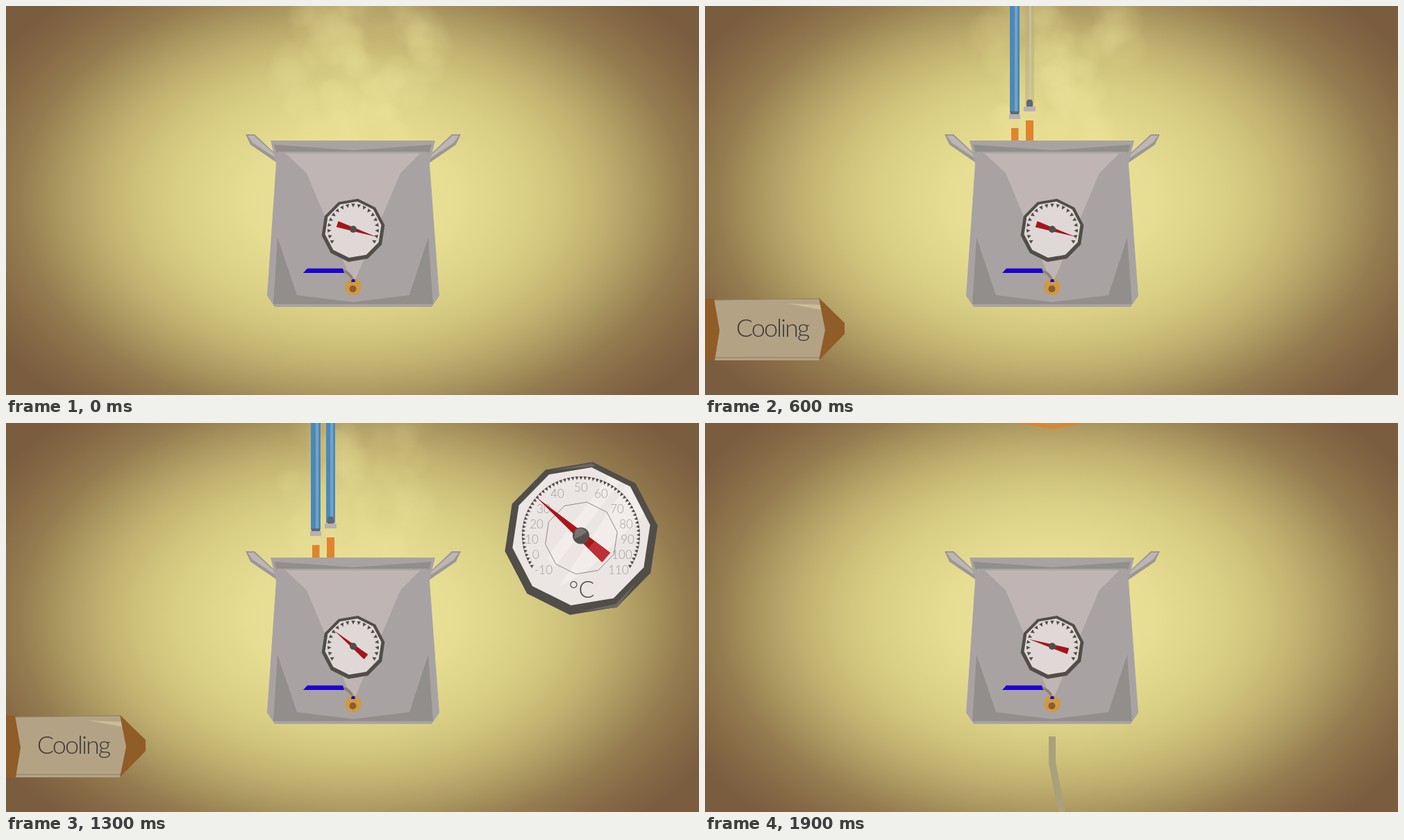
Write an HTML page that moves like this. It is 998 px wide and 561 px high and loops after 2 s.

```html
<!DOCTYPE html>
<html lang="en">
<head>
<meta charset="utf-8">
<title>Cooling the wort</title>
<style>
  html, body { margin: 0; width: 100%; height: 100%; overflow: hidden; background: #7a5c3f; }
  svg { display: block; width: 100vw; height: 100vh; }
  text { font-family: Lato, "Open Sans", sans-serif; font-weight: 300; text-anchor: middle; }
  .metal { fill: #a8a3a2; }
  .shade { fill: #928e8b; }
  .light { fill: #beb5b4; }
  .frame { fill: #514d48; }
  .brown { fill: #905c28; }
  .copper { fill: #e0842f; }
  .joint { fill: #e6db92; }
  .water { fill: #4c89b8; }
  .coil { fill: none; stroke: #e0842f; stroke-width: 5; }
</style>
</head>
<body>
<svg viewBox="0 0 998 561" preserveAspectRatio="none">
  <defs>
    <radialGradient id="backdrop" gradientUnits="userSpaceOnUse" r="600"
      gradientTransform="translate(499 280) scale(1 .667)" cx="0" cy="0">
      <stop offset="0" stop-color="#ebe4a0"/>
      <stop offset=".25" stop-color="#e6dd92"/>
      <stop offset=".4" stop-color="#dbd186"/>
      <stop offset=".5" stop-color="#d0c47c"/>
      <stop offset=".6" stop-color="#c1b170"/>
      <stop offset=".7" stop-color="#ab9860"/>
      <stop offset=".8" stop-color="#957c50"/>
      <stop offset=".9" stop-color="#866a46"/>
      <stop offset="1" stop-color="#7a5c3f"/>
    </radialGradient>
    <radialGradient id="puff">
      <stop offset="0" stop-color="#ece39b"/>
      <stop offset=".65" stop-color="#ece39b" stop-opacity=".8"/>
      <stop offset="1" stop-color="#ece39b" stop-opacity="0"/>
    </radialGradient>
    <clipPath id="bigFace"><path id="faceClip"/></clipPath>
    <g id="handle">
      <path fill="#9b9795" d="M345 185H358L390 215V226L352 200Z"/>
      <path class="light" d="M348 187H357L388 215V219L355 197Z"/>
    </g>
  </defs>

  <rect width="998" height="561" fill="url(#backdrop)"/>
  <g id="smoke"></g>

  <g id="chiller">
    <g id="turns"></g>
    <path class="coil" d="M467 220L421 234"/>
    <path class="copper" d="M441 176h10.500v125h-10.500ZM462 165h11v58h-11Z"/>
    <path class="joint" d="M440 163h12v13h-12ZM461 152h13v13h-13Z"/>
    <g fill="#b9ae85" fill-opacity=".5">
      <path d="M439-600h14V156h-14ZM461-600h13V144h-13Z"/>
      <path fill="#d6ceb0" d="M447-600h2V156h-2ZM467-600h3V144h-3Z"/>
    </g>
    <g id="leftWater"><rect class="water" x="439" width="14" height="754"/><rect x="446" width="4" height="754" fill="#70a3c8"/></g>
    <g id="rightWater"><rect class="water" x="461" width="13" height="744"/><rect x="467" width="4" height="744" fill="#70a3c8"/></g>
    <path fill="#5e6870" d="M440 152h12v4h-12ZM463 138l2-3h5l2 3v7h-9Z"/>
    <path fill="#b9b1b0" d="M438 156h16v7h-16ZM459 145h17v7h-17Z"/>
  </g>

  <g id="kettle">
    <use href="#handle"/>
    <use href="#handle" transform="translate(1000) scale(-1 1)"/>
    <path class="metal" d="M381 194H618L610 227L624 418L613 434H387L376 418L389 227Z"/>
    <path class="light" d="M402 212H597L568 241L503 395H497L433 241Z"/>
    <path class="shade" d="M386 200L500 208L613 200L609 212H390Z"/>
    <path class="metal" d="M391 210H608V212.500H391Z"/>
    <path class="shade" d="M391 334L419 417L500 427L581 417L608 334L615 430H385Z"/>
    <path fill="none" stroke="#8c8377" stroke-width="4" d="M485 382Q495 384 500 396"/>
    <path fill="#1c00d0" d="M434 378.500H485L487 385H428Z"/>
    <circle cx="500" cy="405" r="12" fill="#cf9a45"/>
    <circle cx="499.500" cy="408" r="5" fill="#8d5d2d"/>
    <path fill="#1c00d0" d="M498 394h4l1 4h-6Z"/>
    <path class="frame" id="smallRim"/>
    <path fill="#dfd8d7" id="smallFace"/>
    <path class="frame" id="smallTicks"/>
    <path id="smallNeedle" fill="#a31519" d="M-24-4.500L35 0L-24 4.500Z"/>
    <circle cx="500" cy="322" r="5" class="frame"/>
  </g>

  <g id="dial">
    <path class="frame" id="bigRim"/>
    <path fill="#6b6763" d="M826 272L878 261L908 230L880 266Z"/>
    <path fill="#6b6763" d="M786 68L844 58L849 62L842 63Z"/>
    <path fill="#ebe5e3" id="bigFace2"/>
    <g clip-path="url(#bigFace)" fill="#f4f0ec" fill-opacity=".75">
      <path d="M796 237L896 85L925 125L838 212Z"/>
      <path d="M779 194L873 70L888 80L790 208Z"/>
    </g>
    <path class="frame" id="bigTicks"/>
    <path id="innerRing" fill="none" stroke="#8f8a87"/>
    <g id="numbers" font-size="17" fill="#a39d9b"></g>
    <text x="829" y="252" font-size="34" fill="#4c4744">°C</text>
    <g id="bigNeedle">
      <path fill="#a9151b" d="M-48-9L85 0L-48 9Z"/>
      <path fill="#bd3036" d="M-48-9L-20-7V7L-48 9Z"/>
    </g>
    <circle cx="828" cy="162.500" r="12" fill="#55514d"/>
    <path fill="#77736f" d="M820 154L829 151L837 157L828 163L818 167Z"/>
  </g>

  <g id="label">
    <path fill="#b3a384" d="M8 424L165 422L174 467L165 511H8Z"/>
    <path fill="#c9bd95" d="M118 429L166 431L167 438Z"/>
    <path fill="none" stroke="#8d7d60" d="M14 507H166M14 424L165 422"/>
    <path class="brown" d="M0 422H13L21 468L14 511H0ZM164 421L201 457V473L164 511L173 467Z"/>
    <text x="97" y="477" font-size="36" letter-spacing="-2" fill="#3e3a38">Cooling</text>
  </g>

  <path id="hose" fill="none" stroke="#aaa07b" stroke-width="10" stroke-linejoin="round" d="M500 452V490L510 542L514 561"/>
</svg>
<script>
const LOOP = 2000, STEP = 100;
const byId = id => document.getElementById(id);
const rad = deg => deg * Math.PI / 180;
const polar = (cx, cy, r, deg) =>
  `${(cx + r * Math.cos(rad(deg))).toFixed(2)} ${(cy + r * Math.sin(rad(deg))).toFixed(2)}`;
const range = n => Array.from({ length: n }, (_, i) => i);

function add(parent, tag, attrs, text = '') {
  const node = document.createElementNS('http://www.w3.org/2000/svg', tag);
  for (const key in attrs) node.setAttribute(key, attrs[key]);
  node.textContent = text;
  return byId(parent).appendChild(node);
}

function decagon(id, cx, cy, r) {
  byId(id).setAttribute('d', 'M' + range(10).map(i => polar(cx, cy, r, -81.5 + 36 * i)).join('L') + 'Z');
}

function ticks(id, cx, cy, outer, inner, count, from, to, halfWidth) {
  const gap = (to - from) / (count - 1);
  byId(id).setAttribute('d', range(count).map(i => {
    const a = from + gap * i;
    return `M${polar(cx, cy, outer, a - halfWidth)}L${polar(cx, cy, outer, a + halfWidth)}L${polar(cx, cy, inner, a)}Z`;
  }).join(''));
}

decagon('smallRim', 500, 323.5, 46);
decagon('smallFace', 500, 322.5, 41);
ticks('smallTicks', 500, 322, 37, 31.5, 19, -210, 30, 4.2);
decagon('bigRim', 828.5, 166.5, 111.5);
decagon('bigFace2', 828.5, 163.5, 100.5);
decagon('faceClip', 828.5, 163.5, 100.5);
decagon('innerRing', 828.5, 166, 52.5);
ticks('bigTicks', 828, 162, 85, 80, 61, -212, 32, 1.7);

// Scale numbers, mirrored around the 50 at the top
const rows = [[774, 212], [763, 190], [757, 168], [764, 146], [774, 124], [794, 102], [828, 93],
  [857, 102], [880, 124], [893, 146], [895, 168], [887, 190], [882, 212]];
rows.forEach(([x, y], i) => add('numbers', 'text', { x, y: y + 6 }, String(i * 10 - 10)));

range(8).forEach(i => add('turns', 'path', {
  class: 'coil',
  transform: `translate(0 ${111 + 17.7 * i})`,
  d: i ? 'M446 134L540 129L587 123L572 134L500 146L438 136L421 123L446 134'
       : 'M446 136L540 112L586 123L572 134L540 129L500 146L438 136L421 123'
}));

let seed = 11;
const random = () => (seed = (seed * 16807) % 2147483647) / 2147483647;
const puffs = range(46).map(i => ({
  phase: (i + random()) / 46,
  x: random() - 0.5,
  size: 16 + 18 * random(),
  node: add('smoke', 'circle', { fill: 'url(#puff)' })
}));

const progress = (t, from, to) => Math.min(1, Math.max(0, (t - from) / (to - from)));
const cubicInOut = u => u < 0.5 ? 4 * u ** 3 : 1 - 4 * (1 - u) ** 3;
const move = (id, value) => byId(id).setAttribute('transform', value);
const show = (id, on) => { byId(id).style.display = on ? '' : 'none'; };

function drawSmoke(t) {
  const fade = 1 - 0.95 * progress(t, 1000, 1800);
  for (const p of puffs) {
    const age = (p.phase + t / LOOP) % 1;
    const sway = 14 * Math.sin(age * 6 + p.x * 9);
    p.node.setAttribute('cx', 506 + p.x * (165 + 30 * age) + sway);
    p.node.setAttribute('cy', 190 - 205 * age);
    p.node.setAttribute('r', p.size * (0.9 + 0.5 * age));
    p.node.setAttribute('opacity', 0.24 * (1 - 0.55 * age) * fade);
  }
}

function draw(t) {
  drawSmoke(t);

  const enter = -444 * (1 - progress(t, 0, 400)) ** 2;
  const leave = -375 * progress(t, 1700, 1900) ** 2;
  move('chiller', `translate(0 ${enter + leave})`);

  // Water runs down the left tube, then back up the right one
  move('leftWater', `translate(0 ${-754 + 154 + 754 * progress(t, 400, 600) - 154})`);
  show('leftWater', t > 400);
  move('rightWater', `translate(0 ${-600 + 600 * (1 - progress(t, 600, 800)) * 0.25})`);
  show('rightWater', t >= 800);
  move('leftWater', `translate(0 ${-600 - 156 * (1 - progress(t, 400, 600))})`);

  const small = 18 - 181 * cubicInOut(progress(t, 560, 1640));
  const big = 19 - 176 * cubicInOut(progress(t, 650, 1570));
  move('smallNeedle', `translate(500 322) rotate(${small})`);
  move('bigNeedle', `translate(828 162.500) rotate(${big})`);

  const scale = 1 - 0.15 * (1 - progress(t, 700, 800));
  move('dial', `translate(828 163) scale(${scale}) translate(-828 -163)`);
  show('dial', t >= 700 && t < 1800);

  move('label', `translate(${-210 * (1 - progress(t, 200, 550)) ** 2} 0)`);
  show('label', t > 200 && t < 1800);
  show('hose', t >= 1900);
}

function tick() {
  const t = performance.now() % LOOP;
  draw(Math.floor(t / STEP) * STEP);
  requestAnimationFrame(tick);
}
tick();
</script>
</body>
</html>
```
